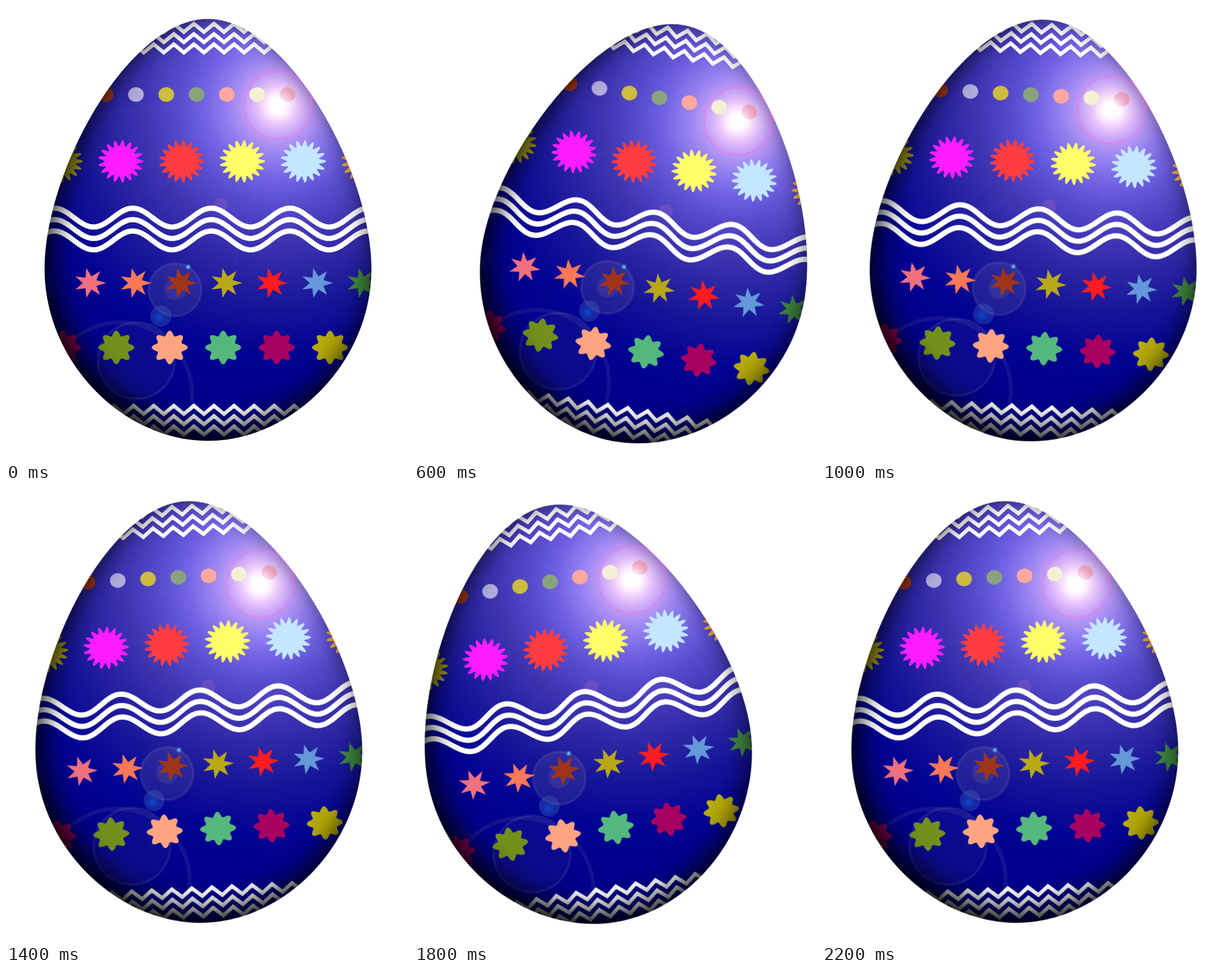
Recreate the animation shown at these times as an HTML page. Size 704 by 795 pixels, loop 2.4 s.

```html
<!DOCTYPE html>
<html lang="en">
<head>
<meta charset="utf-8">
<title>Rocking egg</title>
<style>
  html, body { margin: 0; width: 100%; height: 100%; overflow: hidden; background: #fff; }
  svg { display: block; }
  #egg { transform-origin: 345px 767px; animation: rock 2400ms step-end infinite; }
  @keyframes rock {
    0%, 50%, 100% { transform: rotate(0deg); }
    8.3333%, 41.6666% { transform: rotate(3deg); }
    16.6666%, 33.3333% { transform: rotate(6deg); }
    25% { transform: rotate(9deg); }
    58.3333%, 91.6666% { transform: rotate(-3deg); }
    66.6666%, 83.3333% { transform: rotate(-6deg); }
    75% { transform: rotate(-9deg); }
  }
</style>
</head>
<body>
<svg width="704" height="795" viewBox="0 0 704 795">
  <defs>
    <path id="shell" d="M353.5 22.5C213.5 22.5 67.5 290 67.5 460C67.5 624 205.5 761.5 353.5 761.5C501.5 761.5 640 624 640 460C640 290 493.5 22.5 353.5 22.5Z"/>
    <clipPath id="inside"><use href="#shell"/></clipPath>
    <radialGradient id="glaze" gradientUnits="userSpaceOnUse" cx="476" cy="174" r="640">
      <stop offset="0" stop-color="#fff"/>
      <stop offset=".02" stop-color="#fff"/>
      <stop offset=".04" stop-color="#f4d8fc"/>
      <stop offset=".07" stop-color="#d6b2fa"/>
      <stop offset=".1" stop-color="#b496f4"/>
      <stop offset=".14" stop-color="#9480f0"/>
      <stop offset=".2" stop-color="#7264e4"/>
      <stop offset=".27" stop-color="#584ccc"/>
      <stop offset=".36" stop-color="#4036b4"/>
      <stop offset=".45" stop-color="#2c26a4"/>
      <stop offset=".55" stop-color="#171599"/>
      <stop offset=".68" stop-color="#020292"/>
      <stop offset="1" stop-color="#000084"/>
    </radialGradient>
    <radialGradient id="core">
      <stop offset="0" stop-color="#fff"/>
      <stop offset=".35" stop-color="#fff" stop-opacity=".9"/>
      <stop offset="1" stop-color="#ffd8ff" stop-opacity="0"/>
    </radialGradient>
    <radialGradient id="spot">
      <stop offset="0" stop-color="#0a50d8" stop-opacity=".8"/>
      <stop offset="1" stop-color="#0a40c0" stop-opacity="0"/>
    </radialGradient>
    <radialGradient id="spark">
      <stop offset="0" stop-color="#b0f0ff"/>
      <stop offset=".4" stop-color="#50a0e8" stop-opacity=".8"/>
      <stop offset="1" stop-color="#3070d0" stop-opacity="0"/>
    </radialGradient>
    <filter id="soft" filterUnits="userSpaceOnUse" x="-150" y="-150" width="1000" height="1100">
      <feGaussianBlur stdDeviation="25"/>
    </filter>
  </defs>
  <g id="egg">
    <g clip-path="url(#inside)">
      <use href="#shell" fill="url(#glaze)"/>
      <g id="rays" stroke="#b8b0ff" stroke-opacity=".07"/>
      <g id="ghosts" fill="none">
        <circle cx="376" cy="349" r="12.5" fill="#b070c0" fill-opacity=".25"/>
        <circle cx="296" cy="497" r="46" fill="#8080a0" fill-opacity=".16" stroke="#a080b0" stroke-opacity=".16" stroke-width="4"/>
        <circle cx="296" cy="496" r="19" fill="#a080a0" fill-opacity=".15"/>
        <circle cx="271" cy="543" r="18.5" fill="#5080c0" fill-opacity=".27"/>
        <circle cx="268" cy="546" r="13" fill="url(#spot)"/>
        <circle cx="228" cy="621" r="67" fill="#8080a0" fill-opacity=".07" stroke="#9090b0" stroke-opacity=".16" stroke-width="4"/>
        <circle cx="200" cy="680" r="126" stroke="#8080b0" stroke-opacity=".13" stroke-width="7"/>
      </g>
      <g id="pattern"></g>
      <path id="shade" fill-rule="evenodd" filter="url(#soft)" transform="translate(10 -19)"/>
      <circle cx="476" cy="174" r="59" fill="none" stroke="#f070e8" stroke-opacity=".38" stroke-width="4"/>
      <circle cx="476" cy="174" r="32" fill="url(#core)"/>
      <circle cx="319" cy="457" r="6" fill="url(#spark)"/>
    </g>
  </g>
</svg>
<script>
  const byId = id => document.getElementById(id);
  const pattern = byId('pattern');

  function add(parent, tag, attrs) {
    const el = document.createElementNS('http://www.w3.org/2000/svg', tag);
    for (const key in attrs) el.setAttribute(key, attrs[key]);
    parent.append(el);
  }

  // Polyline through y(x), sampled every `step`
  function trace(from, to, step, y) {
    const pts = [];
    for (let x = from; x <= to; x += step) pts.push(x.toFixed(2) + ' ' + y(x).toFixed(2));
    return 'M' + pts.join('L');
  }

  const line = (d, width) =>
    add(pattern, 'path', { d, fill: 'none', stroke: '#fff', 'stroke-width': width, 'stroke-miterlimit': 8 });

  function zigzag(top) {
    const half = 17.58, start = 329 - 16 * half;
    line(trace(start, 680, half, x => top + (Math.round((x - start) / half) % 2) * 14.5), 6.6);
  }

  function wave(mid) {
    line(trace(50, 660, 3, x => mid - 16.5 * Math.cos((x - 222) / 137.5 * 2 * Math.PI)), 9.2);
  }

  // Closed outline whose radius follows r(angle), slightly flattened
  function blob(cx, cy, count, r) {
    const pts = [];
    for (let i = 0; i < count; i++) {
      const a = i / count * 2 * Math.PI, k = r(a, i);
      pts.push((cx + k * Math.cos(a)).toFixed(2) + ' ' + (cy + k * .935 * Math.sin(a)).toFixed(2));
    }
    return 'M' + pts.join('L') + 'Z';
  }

  const burst = (x, y) => blob(x, y, 204, a => 34 + 6 * Math.cos(17 * a));
  const star = (x, y) => blob(x, y, 14, (a, i) => i % 2 ? 12.6 : 28.4);
  const bloom = (x, y) => blob(x, y, 128, a => 27 + 4.5 * Math.cos(8 * a));
  const dot = (x, y) => blob(x, y, 48, () => 13.7);

  function row(shape, x, y, gap, colors) {
    colors.forEach((fill, i) => add(pattern, 'path', { d: shape(x + i * gap, y), fill }));
  }

  for (let i = 0; i < 26; i++) {
    const a = i * 2.4, far = 230 + (i * 97) % 260;
    add(byId('rays'), 'line', {
      x1: 476 + 60 * Math.cos(a), y1: 174 + 60 * Math.sin(a),
      x2: 476 + far * Math.cos(a), y2: 174 + far * Math.sin(a)
    });
  }

  [31, 49, 67, 700, 718, 736].forEach(zigzag);
  [370.5, 390.5, 410.5].forEach(wave);
  row(dot, 174.5, 155, 53.1, ['#a83818', '#b0acdc', '#ccbc40', '#88a47c', '#ffa8a0', '#f4f0d4', '#eca4bc', '#d890e8']);
  row(burst, 94.5, 272, 106.5, ['#a09a18', '#ff1cff', '#ff3c40', '#ffff68', '#c4e6ff', '#ffb450']);
  row(star, 67.5, 485, 79.5, ['#0008a0', '#f07080', '#f87858', '#a03418', '#b8a818', '#ff1c20', '#6498d8', '#40863c']);
  row(bloom, 99.5, 598, 93.6, ['#a00060', '#74901c', '#ffa480', '#54b87c', '#a80060', '#b8ac08']);

  byId('shade').setAttribute('d', 'M-120-120H820V920H-120Z' + byId('shell').getAttribute('d'));
</script>
</body>
</html>
```
